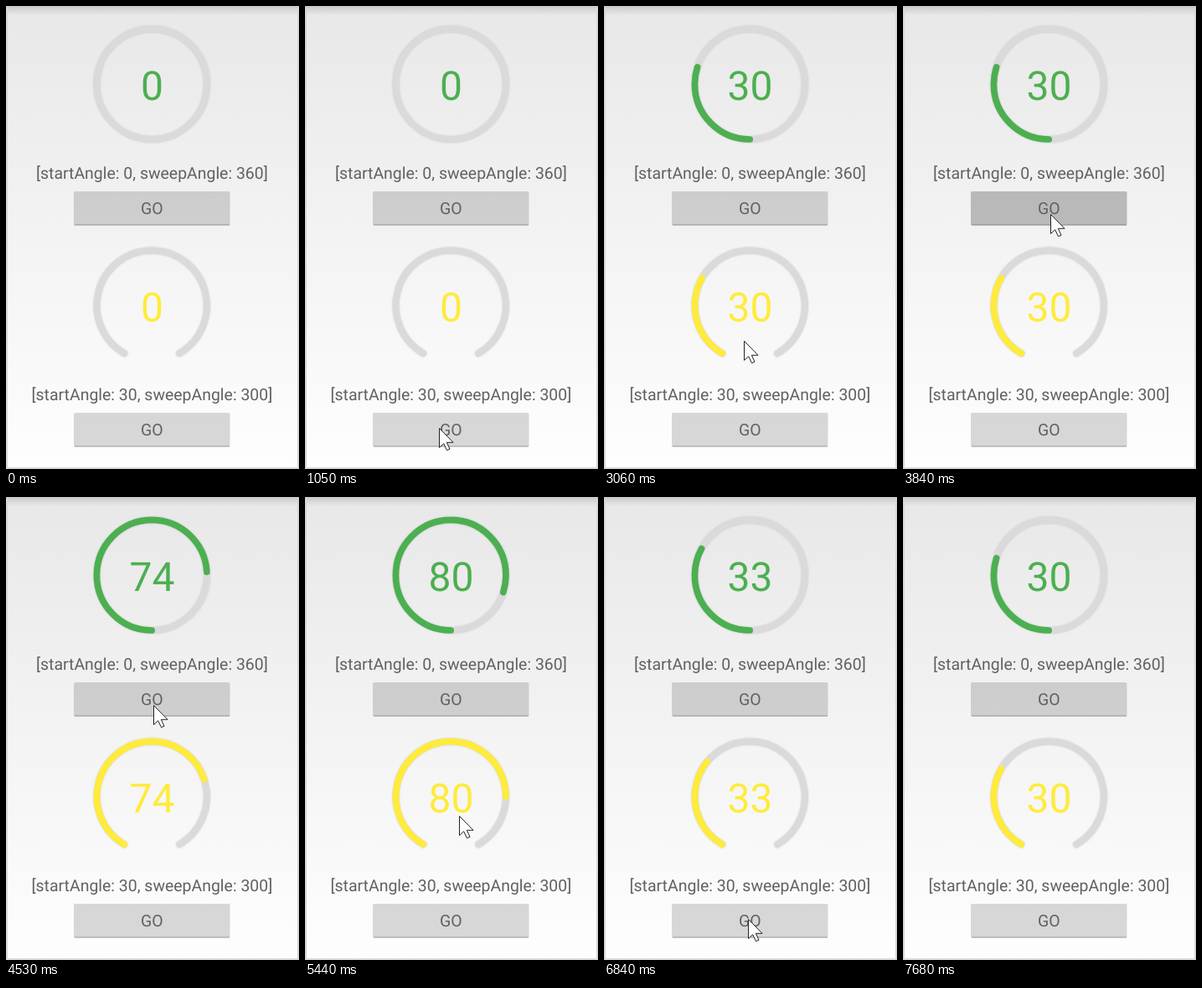
An HTML page for the animation above (8.62 s loop, 350 by 552 pixels).

```html
<!DOCTYPE html>
<html lang="en">
<head>
<meta charset="utf-8">
<title>Arc progress</title>
<style>
  html, body { margin: 0; width: 100%; height: 100%; overflow: hidden; }
  svg { display: block; width: 350px; height: 552px; }
  text { font: 19.45px Roboto, sans-serif; fill: #616161; text-anchor: middle; text-rendering: geometricPrecision; }
  .value { font-size: 48px; }
  .arc { fill: none; stroke-width: 7.7; stroke-linecap: round; }
  .track { stroke: #dadadc; stroke-width: 8; filter: drop-shadow(0 0 1px #0002); }
</style>
</head>
<body>
<svg viewBox="0 0 350 552">
  <defs>
    <linearGradient id="page" x2="0" y2="1">
      <stop stop-color="#e8e8e8"/><stop offset="1" stop-color="#fefefe"/>
    </linearGradient>
    <linearGradient id="shade" x2="0" y2="1">
      <stop stop-opacity=".14"/><stop offset=".3" stop-opacity=".09"/><stop offset="1" stop-opacity="0"/>
    </linearGradient>
  </defs>
  <rect width="350" height="552" fill="url(#page)"/>
  <rect width="350" height="11" fill="url(#shade)"/>
  <path d="M1 2V551H349V2" fill="none" stroke="#d8d8d8" stroke-width="2"/>
  <g id="gauges"></g>
  <path id="cursor" d="M.5 .5V23.5L5.7 18.7L9.5 26.7L13 25.2L9.3 17.3H17Z" fill="#fff" stroke="#222"/>
</svg>
<script>
const LOOP = 8620, FIRST_TICK = 425, TICK = 77;
const MS_PER_PERCENT = 20, PRESS_MARGIN = 78;
const gauges = document.getElementById('gauges');
const cursor = document.getElementById('cursor');

const clamp = p => Math.min(1, Math.max(0, p));
const easeOut = (p, power) => 1 - (1 - p) ** power;
const mix = (a, b, p) => a + (b - a) * p;

// Angles run clockwise from the bottom of the ring.
function arcPath(start, sweep) {
  const point = deg => {
    const a = deg * Math.PI / 180;
    return `${174.2 - 65.8 * Math.sin(a)} ${93.2 + 65.8 * Math.cos(a)}`;
  };
  const arcTo = deg => `A65.8 65.8 0 0 1 ${point(deg)}`;
  return `M${point(start)}${arcTo(start + sweep / 2)}${arcTo(start + sweep)}`;
}

function addGauge(y, start, sweep, color) {
  const d = arcPath(start, sweep);
  const g = document.createElementNS('http://www.w3.org/2000/svg', 'g');
  g.setAttribute('transform', `translate(0 ${y})`);
  g.innerHTML = `
    <path class="arc track" d="${d}"/>
    <path class="arc bar" d="${d}" pathLength="100" stroke="${color}"/>
    <text class="value" x="174.5" y="112" style="fill:${color}"></text>
    <text x="174.4" y="206">[startAngle: ${start}, sweepAngle: ${sweep}]</text>
    <rect class="button" x="81" y="221" width="186.5" height="40.5" rx="1.5"/>
    <path d="M82 261H267" stroke="#000" stroke-opacity=".2" stroke-width="1.3"/>
    <text x="174.3" y="248">GO</text>`;
  gauges.append(g);
  const [bar, value, button] = ['.bar', '.value', '.button'].map(s => g.querySelector(s));
  return (progress, pressed) => {
    value.textContent = progress;
    bar.setAttribute('stroke-dasharray', `${progress} 200`);
    bar.setAttribute('visibility', progress ? 'visible' : 'hidden');
    button.setAttribute('fill-opacity', pressed ? .235 : .148);
  };
}

const drawGauges = [
  addGauge(0, 0, 360, '#4caf50'),
  addGauge(264, 30, 300, '#ffeb3b')
];

const runs = [
  { click: 1445, target: 30 },
  { click: 3850, target: 80, button: 0 },
  { click: 6047, target: 30, button: 1 }
];

// Each move leaves from where the previous one ended; bend bows it sideways.
const entry = { x: 201, y: 341 };
const moves = [
  { start: 425, end: 1041, x: 160, y: 503, bend: 0 },
  { start: 2889, end: 3351, x: 176, y: 248, bend: 0 },
  { start: 5199, end: 5738, x: 172, y: 503, bend: 10 },
  { start: 7201, end: 7663, x: 197, y: 489, bend: 0 }
];

function progressAt(time) {
  let value = 0;
  for (const { click, target } of runs) {
    const duration = MS_PER_PERCENT * Math.abs(target - value);
    value = mix(value, target, easeOut(clamp((time - click) / duration), 2));
    if (time < click + duration) break;
  }
  return Math.round(value);
}

function drawCursor(time) {
  let { x, y } = entry;
  for (const move of moves) {
    const p = clamp((time - move.start) / (move.end - move.start));
    const eased = easeOut(p, 1.3);
    x = mix(x, move.x, eased) + move.bend * Math.sin(Math.PI * p);
    y = mix(y, move.y, eased);
  }
  const shown = time >= moves[0].start && time < moves.at(-1).end;
  cursor.setAttribute('visibility', shown ? 'visible' : 'hidden');
  cursor.setAttribute('transform', `translate(${Math.round(x)} ${Math.round(y)})`);
}

function draw(elapsed) {
  const time = FIRST_TICK + TICK * Math.floor((elapsed - FIRST_TICK) / TICK);
  const progress = progressAt(time);
  drawGauges.forEach((drawGauge, i) => {
    const pressed = runs.some(r => r.button === i
      && time >= r.click - PRESS_MARGIN && time < r.click + PRESS_MARGIN - 2);
    drawGauge(progress, pressed);
  });
  drawCursor(time);
}

const begin = performance.now();
function loop() {
  draw((performance.now() - begin) % LOOP);
  requestAnimationFrame(loop);
}
loop();
</script>
</body>
</html>
```
